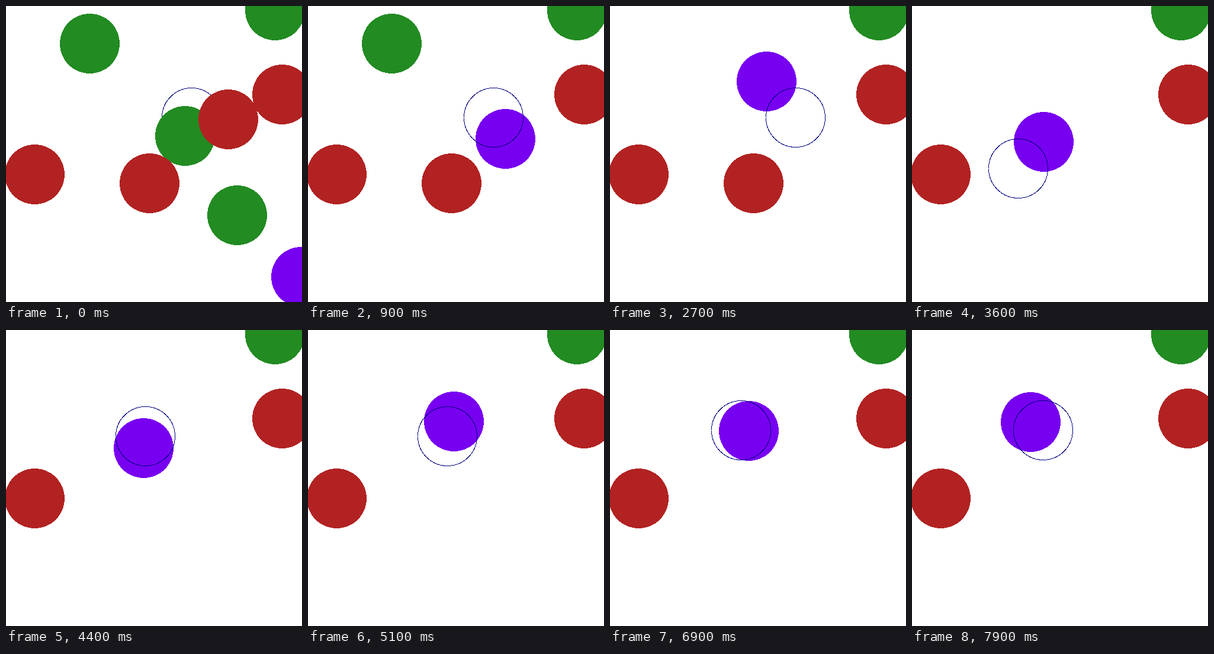
Animation, 500 px wide and 500 px high, one loop 8000 ms. Source, as an HTML page:

```html
<!DOCTYPE html>
<html lang="en">
<head>
<meta charset="utf-8">
<title>Ball on a spring</title>
<style>
  html, body { margin: 0; width: 100%; height: 100%; overflow: hidden; background: #fff; }
  svg { display: block; width: 100%; height: 100%; shape-rendering: crispEdges; }
  #ball { fill: #7800f0; }
  #ring { fill: none; stroke: #000080; stroke-width: 1; stroke-dasharray: 0 .5 156.08 1 156.08 .5; }
  .green { fill: #228b22; }
  .red { fill: #b22222; }
</style>
</head>
<body>
<svg viewBox="0 0 500 500">
  <circle id="ball" r="50.5"/>
  <circle id="ring" r="50"/>
  <g id="dots"></g>
</svg>
<script>
const STEP = 100, STEPS = 80;
const DAMP = 0.0142, FREQ = 0.1612;

// Each phase releases the ball at rest from `from`; it swings about `rest`.
const phases = [
  { at: 0, ring: [313, 188], from: [498.5, 457.8], rest: [311, 192.7] },
  { at: 29, ring: [179, 274], from: [284.3, 155], rest: [180.6, 278.1] },
  { at: 37, ring: [235, 179], from: [222, 229], rest: [238.2, 179] },
  { at: 65, ring: [221, 169], from: [240.5, 172.5], rest: [213.7, 160.9] }
];

// Dots disappear at step `gone`, when the ball touches them.
const dots = [
  { x: 141, y: 63, kind: "green", gone: 13 },
  { x: 454, y: 7, kind: "green" },
  { x: 302, y: 219, kind: "green", gone: 8 },
  { x: 390, y: 353, kind: "green", gone: 4 },
  { x: 48, y: 284, kind: "red" },
  { x: 242, y: 299, kind: "red", gone: 35 },
  { x: 375, y: 191, kind: "red", gone: 8 },
  { x: 466, y: 149, kind: "red" }
];

const ball = document.getElementById("ball");
const ring = document.getElementById("ring");
const group = document.getElementById("dots");

function place(el, x, y) {
  el.setAttribute("cx", Math.round(x) + 0.5);
  el.setAttribute("cy", Math.round(y) + 0.5);
}

for (const dot of dots) {
  dot.el = document.createElementNS("http://www.w3.org/2000/svg", "circle");
  dot.el.setAttribute("r", 50.5);
  dot.el.setAttribute("class", dot.kind);
  place(dot.el, dot.x, dot.y);
  group.append(dot.el);
}

// Remaining share of the first stretch of a damped spring.
function swing(u) {
  return Math.exp(-DAMP * u) * (Math.cos(FREQ * u) + DAMP / FREQ * Math.sin(FREQ * u));
}

function draw(n) {
  const { at, ring: spot, from, rest } = phases.findLast(p => p.at <= n);
  const left = swing(n - at + 0.45);
  place(ball, ...rest.map((c, i) => c + (from[i] - c) * left));
  place(ring, ...spot);
  for (const dot of dots) {
    dot.el.style.display = n >= (dot.gone ?? STEPS) ? "none" : "";
  }
}

const begin = performance.now();
function tick() {
  draw(Math.floor((performance.now() - begin) / STEP) % STEPS);
  requestAnimationFrame(tick);
}
tick();
</script>
</body>
</html>
```
